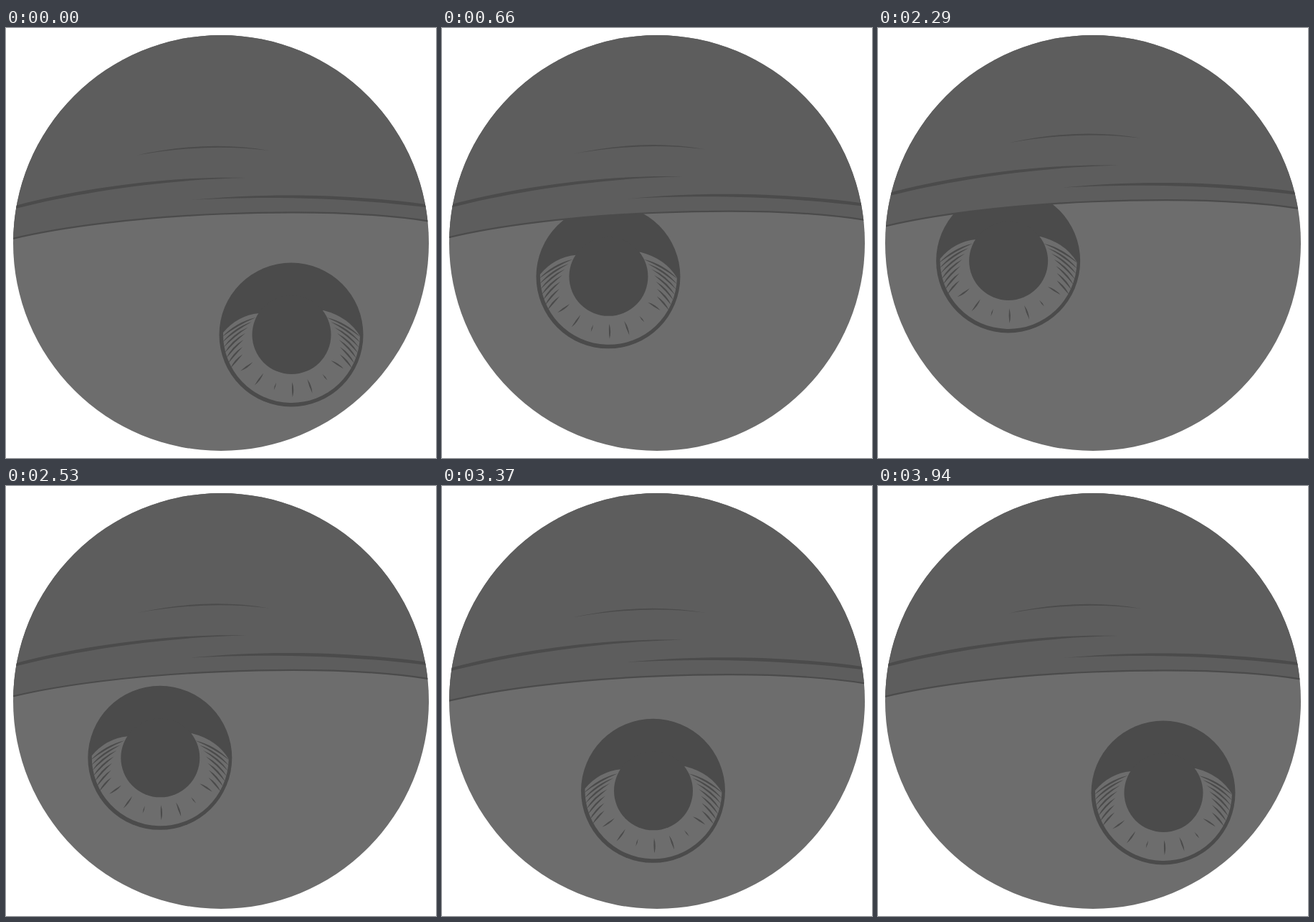
Animation, 600 px wide and 600 px high, one loop 9710 ms. Source, as an HTML page:

```html
<!DOCTYPE html>
<html lang="en">
<head>
<meta charset="utf-8">
<title>Looking eye</title>
<style>
  html, body { margin: 0; width: 100%; height: 100%; overflow: hidden; background: #fff; }
  svg { display: block; width: 100%; height: 100%; }
</style>
</head>
<body>
<svg viewBox="0 0 600 600" fill="#4b4b4b">
  <clipPath id="ball"><circle cx="300" cy="300" r="290" shape-rendering="crispEdges"/></clipPath>
  <g clip-path="url(#ball)">
    <rect width="600" height="600" fill="#6d6d6d"/>
    <g id="iris">
      <circle r="100.5"/>
      <path fill="#6d6d6d" d="M-95-3Q-75-27-45-30L45-34Q80-25 96 2A95.500 95.500 0 0 1-95-3"/>
      <path id="dashes"/>
      <path id="streaks"/>
      <use href="#streaks" transform="scale(-1 1)"/>
      <circle cx=".5" r="55"/>
    </g>
    <g id="lid">
      <path fill="#5d5d5d" stroke="#4b4b4b" stroke-width="2.2"
        d="M-10 299C70 277 190 264 300 259.500S520 256 610 273V-60H-10Z"/>
      <path d="M183 177.500Q280 156 367 171Q280 160 183 177.500"/>
      <path d="M0 251.500C90 226 220 206 335 209C220 211 90 231 0 255.500Z"/>
      <path d="M258 240C350 231 470 229 600 248V252C470 235 350 235 258 240"/>
    </g>
  </g>
</svg>
<script>
const el = id => document.getElementById(id);

// Tapered, slightly bent stroke between two points given as angle and radius
function lens(a1, r1, a2, r2, width, bend = 0) {
  const polar = (a, r) => [r * Math.cos(a * Math.PI / 180), r * Math.sin(a * Math.PI / 180)];
  const [x1, y1] = polar(a1, r1), [x2, y2] = polar(a2, r2);
  const dx = x2 - x1, dy = y2 - y1, len = Math.hypot(dx, dy);
  const ctrl = o => `${(x1 + x2) / 2 + dy / len * o} ${(y1 + y2) / 2 - dx / len * o}`;
  return `M${x1} ${y1}Q${ctrl(bend + width)} ${x2} ${y2}Q${ctrl(bend - width)} ${x1} ${y1}`;
}
const draw = (id, stroke) =>
  el(id).setAttribute('d', Array.from({ length: 7 }, (_, i) => stroke(i)).join(''));

draw('dashes', i => {
  const a = 33 + 18.6 * i;
  return i % 3 === 1 ? lens(a, 70, a, 81, 1.5) : lens(a, 66, a, 87, 2.3, 1);
});
draw('streaks', i => lens(8 * i - 26, 55 + 3 * i, 2 + 4.5 * i, 97, 2.4, 6 - .7 * i));

const poses = [
  { start: 0, end: 0, x: 398, y: 428, lid: 0 },
  { start: 0, end: 600, x: 238, y: 350, lid: 0 },
  { start: 600, end: 1290, x: 178, y: 319, lid: -20 },
  { start: 2260, end: 2860, x: 242, y: 424, lid: 8 },
  { start: 3160, end: 3940, x: 398, y: 428, lid: 0 }
];

// Brisk start, soft stop
const ease = u => 1.1 * u * (1 - u) ** 2 + u * u * (3 - 2 * u);
const mix = (a, b, p) => a + (b - a) * p;

function frame(now) {
  let t = now % 9710;
  const shift = t < 2000 ? 0 : 10;
  t = Math.floor((t - shift) / 30) * 30 + shift;
  const i = Math.max(1, poses.findLastIndex(p => t >= p.start));
  const from = poses[i - 1], to = poses[i];
  const u = Math.min(1, (t - to.start) / (to.end - to.start));
  // The lid rises steadily and drops with a soft stop
  const lid = mix(from.lid, to.lid, to.lid < from.lid ? u : u * (2 - u));
  const x = mix(from.x, to.x, ease(u)), y = mix(from.y, to.y, ease(u));
  el('iris').setAttribute('transform', `translate(${x} ${y})`);
  el('lid').setAttribute('transform', `translate(0 ${lid})`);
}

let begin;
function tick(now) {
  begin ??= now;
  frame(now - begin);
  requestAnimationFrame(tick);
}
frame(0);
requestAnimationFrame(tick);
</script>
</body>
</html>
```
